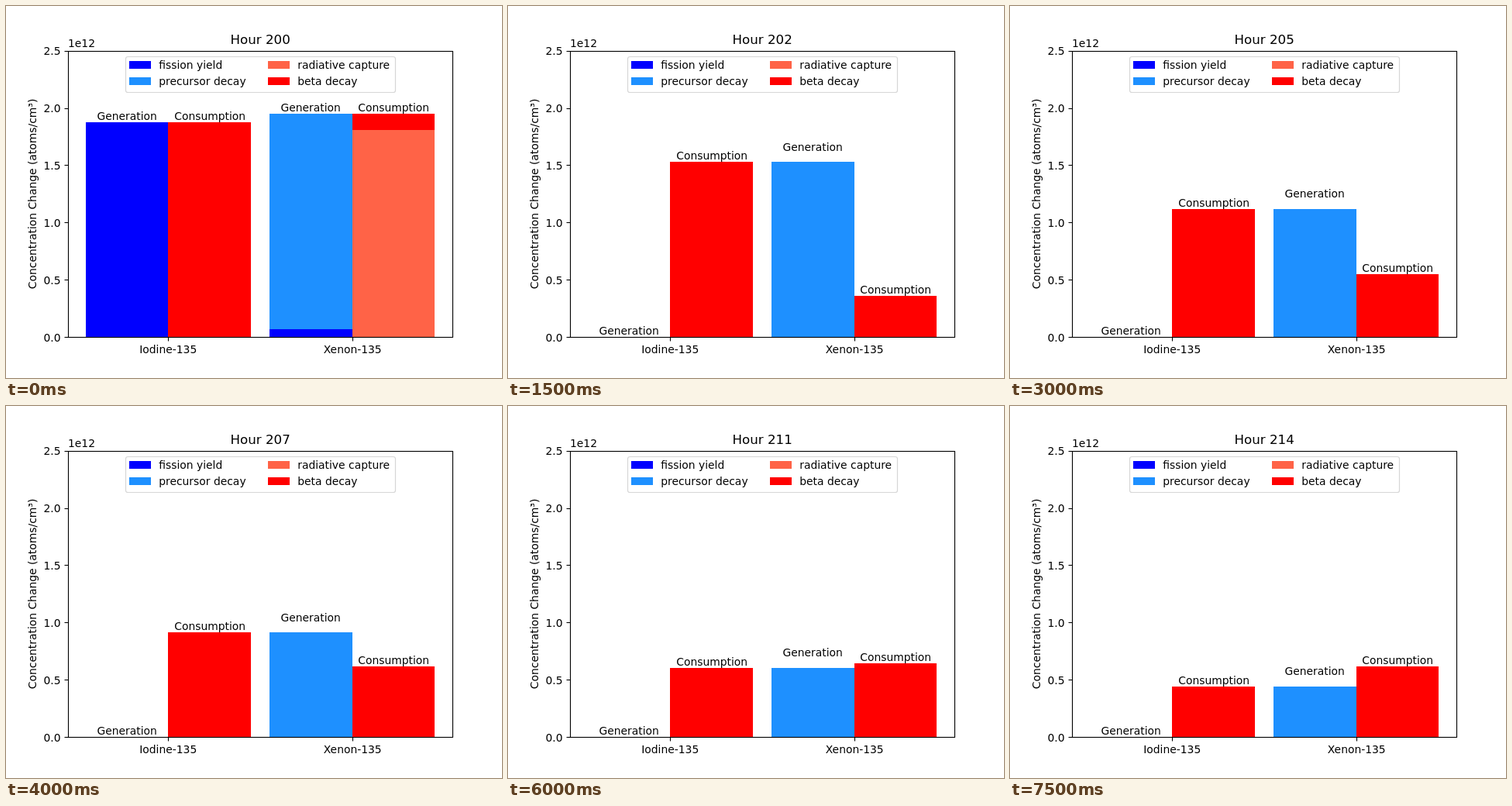
An HTML page with a canvas that plays this animation: 640 by 480 pixels, repeating every 8 s.

```html
<!DOCTYPE html>
<html lang="en">
<head>
<meta charset="utf-8">
<title>Iodine and xenon balance</title>
<style>
html, body { margin: 0; width: 100%; height: 100%; overflow: hidden; background: #fff; }
canvas { display: block; }
</style>
</head>
<body>
<canvas id="chart" width="640" height="480"></canvas>
<script>
const ctx = document.getElementById('chart').getContext('2d');
const BLUE = '#0000ff', SKY = '#1e90ff', TOMATO = '#ff6347', RED = '#ff0000';
const LEFT = 80, RIGHT = 576, TOP = 57.6, BASE = 427.2;
const BAR_X = [103, 209, 340, 447, 553];
// Top edge of the xenon consumption bar, one per hour from 201
const XENON_TOP = [389, 374, 362, 353, 346, 340, 336, 334, 332, 331, 332, 332, 334, 336];

function text(str, x, y, align = 'center', size = 13.89) {
  ctx.font = `${size}px "DejaVu Sans", sans-serif`;
  ctx.textAlign = align;
  ctx.fillStyle = '#000';
  ctx.fillText(str, x, y);
}

function bar(x0, x1, top, color, bottom = 427) {
  ctx.fillStyle = color;
  ctx.fillRect(x0, top, x1 - x0, bottom - top);
}

function line(x0, y0, x1, y1) {
  ctx.beginPath();
  ctx.moveTo(x0, y0);
  ctx.lineTo(x1, y1);
  ctx.stroke();
}

function drawAxes() {
  ctx.strokeStyle = '#000';
  ctx.lineWidth = 1.11;
  ctx.strokeRect(LEFT + .5, 58.5, RIGHT - LEFT, 369);
  for (let i = 0; i <= 5; i++) {
    const y = BASE - (BASE - TOP) * i / 5;
    const snapped = Math.round(y) + .5;
    line(75.5, snapped, LEFT + .5, snapped);
    text((i / 2).toFixed(1), 70.5, Math.round(y + 5.3), 'right');
  }
  [['Iodine-135', 209], ['Xenon-135', 447]].forEach(([name, x]) => {
    line(x + .5, 427.5, x + .5, 432.5);
    text(name, x + .2, 448);
  });
  text('1e12', 80, 53, 'left');
  ctx.save();
  ctx.translate(39, 242.4);
  ctx.rotate(-Math.PI / 2);
  text('Concentration Change (atoms/cm³)', 0, 0);
  ctx.restore();
}

function drawLegend() {
  ctx.strokeStyle = '#d6d6d6';
  ctx.lineWidth = 1.2;
  ctx.beginPath();
  ctx.roundRect(154.5, 65.5, 348, 46, 2.8);
  ctx.stroke();
  [['fission yield', BLUE], ['precursor decay', SKY],
   ['radiative capture', TOMATO], ['beta decay', RED]].forEach(([name, color], i) => {
    const x = i < 2 ? 159 : 338, y = i % 2 ? 92 : 71;
    bar(x, x + 28, y, color, y + 10);
    text(name, x + 38.2, y + 10, 'left');
  });
}

function drawBars(hour) {
  const [a, b, c, d, e] = BAR_X;
  const mid = 316;
  let labels;
  if (hour === 200) {
    bar(a, b, 150, BLUE);
    bar(b, mid, 150, RED);
    bar(c, d, 139, SKY, 417);
    bar(c, d, 417, BLUE);
    bar(d, e, 139, RED, 160);
    bar(d, e, 160, TOMATO);
    labels = [150, 150, 139, 139];
  } else {
    const decay = BASE - 250.4 * Math.exp(-.1033 * (hour - 201));
    const iodine = Math.round(decay), xenon = XENON_TOP[hour - 201];
    bar(b, mid, iodine, RED);
    bar(c, d, iodine, SKY);
    bar(d, e, xenon, RED);
    labels = [427, iodine, Math.round(decay - 11.7), xenon];
  }
  return labels;
}

function draw(hour) {
  ctx.fillStyle = '#fff';
  ctx.fillRect(0, 0, 640, 480);
  const labels = drawBars(hour);
  drawAxes();
  labels.forEach((top, i) =>
    text(i % 2 ? 'Consumption' : 'Generation', [156.2, 263.2, 393.2, 500.2][i], top - 3));
  text('Hour ' + hour, 328.2, 49, 'center', 16.67);
  drawLegend();
}

function frame(now) {
  const t = now % 8000;
  draw(200 + Math.max(0, Math.floor(t / 500) - 1));
  requestAnimationFrame(frame);
}
frame(0);
</script>
</body>
</html>
```
